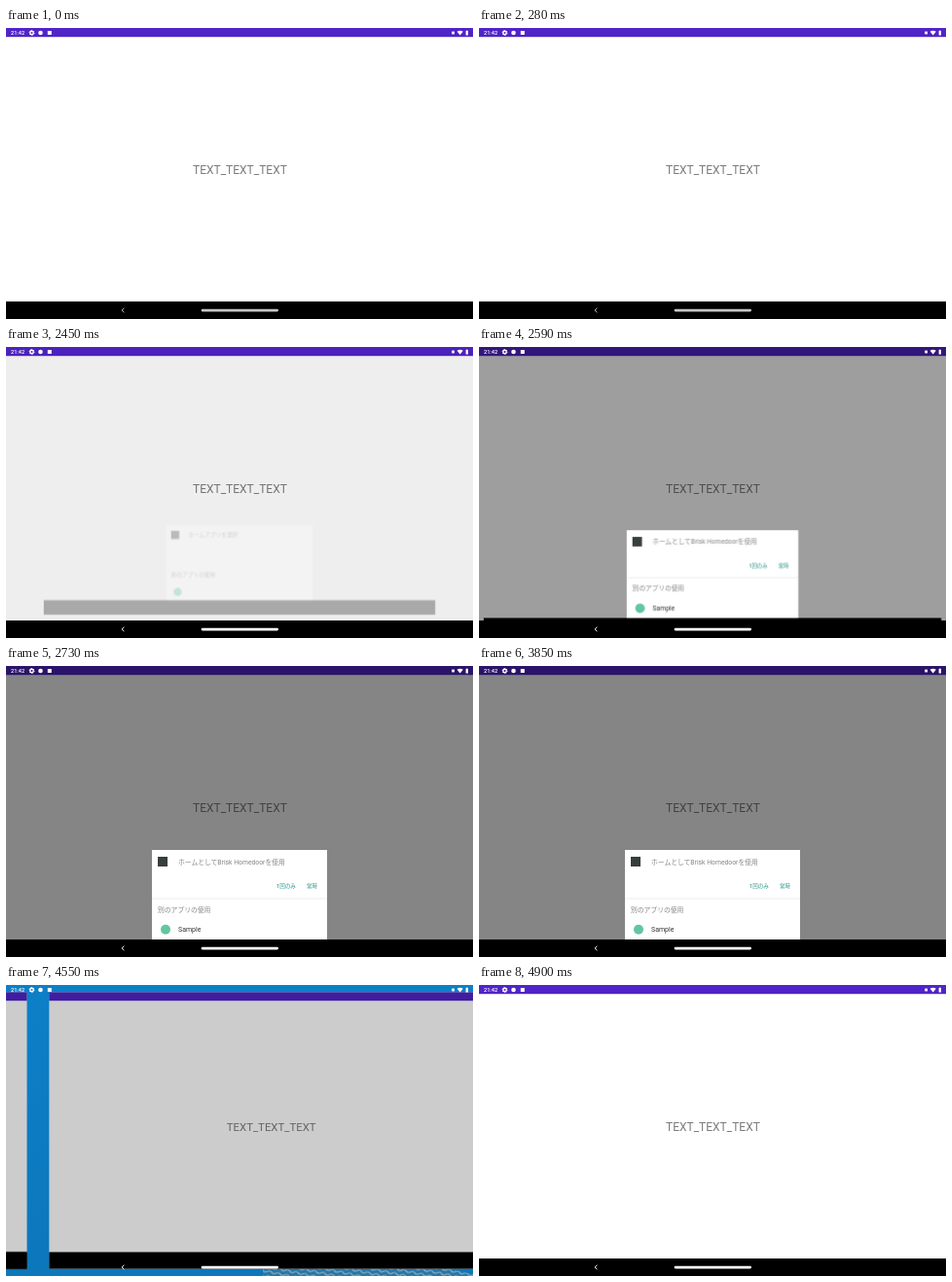
Write an HTML page that moves like this. It is 480 by 299 pixels and loops after 5.32 s.

```html
<!DOCTYPE html>
<html lang="en">
<head>
<meta charset="utf-8">
<title>Home app chooser</title>
<style>
  html, body { margin: 0; width: 100%; height: 100%; overflow: hidden; background: #000; }
  svg { display: block; width: 100%; height: 100%; }
  text { font-family: Roboto, "Noto Sans CJK JP", "Noto Sans CJK", sans-serif; }

  .zoom, .slide, .dim, .open, .fade, .first, .later, .press, .ripple, .ink {
    animation: 5320ms linear infinite paused;
  }
  .zoom { animation-name: zoom; transform-origin: 240px 149.5px; }
  .slide { animation-name: slide; }
  .dim { animation-name: dim; }
  .open { animation-name: open; transform-origin: 240px 152px; }
  .fade { animation-name: fade; }
  .first { animation-name: first; }
  .later { animation-name: later; }
  .press { animation-name: press; }
  .ripple { animation-name: ripple; }
  .ink { animation-name: ink; }

  /* task switch: shrink, slide one task to the left, grow back */
  @keyframes zoom {
    0%, 80.64% { transform: scale(1); animation-timing-function: cubic-bezier(.4, 0, .2, 1); }
    85.96% { transform: scale(.95); animation-timing-function: cubic-bezier(.4, 0, .2, 1); }
    91.92%, 100% { transform: scale(1); }
  }
  @keyframes slide {
    0%, 80.64% { transform: translateX(0); animation-timing-function: cubic-bezier(.4, 0, .2, 1); }
    87.74%, 100% { transform: translateX(-504px); }
  }
  @keyframes dim {
    0%, 46% { opacity: 0; }
    46.05% { opacity: .067; }
    48.68% { opacity: .38; animation-timing-function: ease-out; }
    51.3%, 80.64% { opacity: .478; }
    82.89% { opacity: .35; }
    89.1%, 100% { opacity: 0; }
  }

  /* dialog window */
  @keyframes open {
    0%, 46.05% { transform: scale(.838); animation-timing-function: cubic-bezier(.215, .61, .355, 1); }
    51.3%, 100% { transform: scale(1); }
  }
  @keyframes fade {
    0%, 46% { opacity: 0; }
    46.05% { opacity: .29; }
    47.9%, 100% { opacity: 1; }
  }
  @keyframes first {
    0%, 47.3% { opacity: 1; }
    47.35%, 100% { opacity: 0; }
  }
  @keyframes later {
    0%, 47.3% { opacity: 0; }
    47.35%, 100% { opacity: 1; }
  }
  @keyframes press {
    0%, 75.5% { opacity: 0; }
    78.94%, 100% { opacity: 1; }
  }

  /* navigation bar */
  @keyframes ripple {
    0%, 28.9% { x: 222px; width: 36px; opacity: 0; }
    28.94% { x: 222px; width: 36px; opacity: 1; animation-timing-function: ease-out; }
    32.9% { x: 200px; width: 80px; opacity: .9; }
    36.8%, 100% { x: 200px; width: 80px; opacity: 0; }
  }
  @keyframes ink {
    0%, 28.9% { opacity: .78; }
    31.5%, 100% { opacity: 1; }
  }
</style>
</head>
<body>
<svg viewBox="0 0 480 299" preserveAspectRatio="none">
  <defs>
    <linearGradient id="sky" x2="0" y2="1">
      <stop offset="0" stop-color="#06a"/>
      <stop offset="0" stop-color="#0f9ffa"/>
      <stop offset="1" stop-color="#1094ea"/>
    </linearGradient>
    <pattern id="waves" width="9" height="5" patternUnits="userSpaceOnUse" patternTransform="rotate(12)">
      <rect width="9" height="5" fill="#2f93d2"/>
      <path d="M0 2 Q2.5 0 4.5 2 T9 2" fill="none" stroke="#b9dcec" stroke-width="1.1"/>
    </pattern>
    <g id="app">
      <rect width="480" height="299" fill="#fff"/>
      <rect width="480" height="9.2" fill="#5024c8"/>
      <rect y="281" width="480" height="18"/>
      <text x="192" y="150" font-size="12" fill="#7c7c7c">TEXT_TEXT_TEXT</text>
    </g>
  </defs>

  <rect width="480" height="299" fill="url(#sky)"/>
  <path d="M264 299 V257 Q276 253 300 258 L480 297 V299 Z" fill="url(#waves)"/>
  <path d="M264 262 V257 Q276 253 300 258 V264 Q280 259 264 262 Z" fill="#d5dde0"/>

  <g class="zoom"><g class="slide">
    <use href="#app"/>
    <use href="#app" x="504"/>
  </g></g>

  <rect class="dim" width="480" height="299"/>

  <g class="zoom"><g class="slide"><g class="open"><g class="fade">
    <rect y="281" width="480" height="18"/>
    <rect x="150" y="189" width="180" height="92" fill="#fff"/>
    <rect class="press" x="150" y="260.6" width="180" height="20.4" fill="#e4e4e4"/>
    <rect x="156" y="196" width="10" height="10" fill="#383d3d"/>
    <circle cx="164" cy="270.8" r="5" fill="#62c6a0"/>
    <g font-size="6.8" fill="#858585">
      <text class="first" x="177" y="203.5">ホームアプリを選択</text>
      <text class="later" x="177" y="203.5">ホームとしてBrisk Homedoorを使用</text>
      <text x="156" y="252.6">別のアプリの使用</text>
    </g>
    <g class="later">
      <rect x="150" y="238.7" width="180" height=".6" fill="#e2e2e2"/>
      <g font-size="5.5" font-weight="500" fill="#27978b">
        <text x="278" y="228">1回のみ</text>
        <text x="309" y="228">常時</text>
      </g>
      <text x="177" y="273.4" font-size="7" fill="#333">Sample</text>
    </g>
  </g></g></g></g>

  <!-- status icons -->
  <g fill="#fff">
    <text x="5" y="7" font-size="5.6" font-weight="500">21:42</text>
    <circle cx="26.5" cy="5" r="1.7" fill="none" stroke="#fff" stroke-width="1.4"/>
    <circle cx="26.5" cy="5" r="2.5" fill="none" stroke="#fff" stroke-width=".9" stroke-dasharray="1.3 1.318"/>
    <circle cx="35.5" cy="5" r="2.3"/>
    <rect x="42.8" y="3" width="4" height="4"/>
    <rect x="458.2" y="3.6" width="2.8" height="2.8"/>
    <path d="M463.6 3.8 Q466.7 1.6 469.8 3.8 L466.7 7.6 Z"/>
    <path d="M472.6 3 H473.2 V2.4 H474.4 V3 H475 V7.6 H472.6 Z"/>
  </g>

  <!-- navigation -->
  <rect class="ripple" x="222" y="281.3" width="36" height="17" rx="8.5" fill="#303030"/>
  <g class="ink">
    <path d="M121.3 287.7 L119.1 290 L121.3 292.3" fill="none" stroke="#fff" stroke-width=".9"/>
    <rect x="200.6" y="288.8" width="79.4" height="2.6" rx="1.3" fill="#fff"/>
  </g>
</svg>
<script>
  const LOOP = 5320, STEP = 70;
  const anims = document.getAnimations();

  function draw() {
    const t = performance.now() % LOOP;
    const held = Math.floor(t / STEP) * STEP;
    for (const a of anims) a.currentTime = held;
    requestAnimationFrame(draw);
  }
  draw();
</script>
</body>
</html>
```
